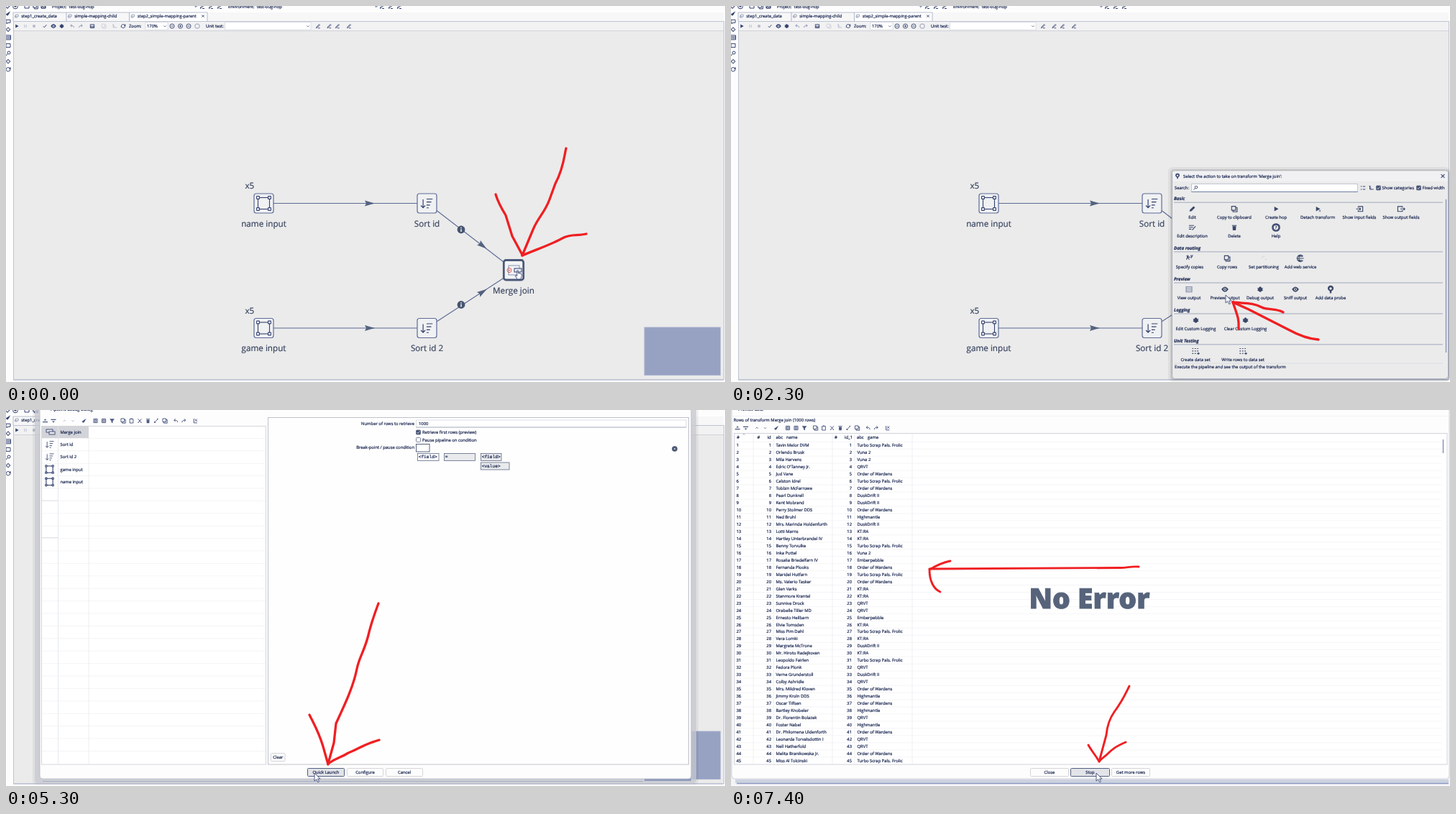
Animation of 1000 by 523 pixels, one loop 8000 ms. Source, as an HTML page:

```html
<!DOCTYPE html>
<html lang="en">
<head>
<meta charset="utf-8">
<title>Pipeline preview</title>
<style>
html, body { margin: 0; width: 100%; height: 100%; overflow: hidden; background: #fff; }
svg { display: block; width: 100%; height: 100%; }
text { font-family: "Open Sans", "Noto Sans", sans-serif; font-size: 5.87px; fill: #1f2b55; stroke: #1f2b55; stroke-width: .22px; text-rendering: geometricPrecision; white-space: pre; }
.big { font-size: 11.7px; fill: #36425f; stroke: #36425f; stroke-width: .2px; }
.head { font-size: 6.2px; font-weight: 700; font-style: italic; }
.mono { font-family: "Liberation Mono", monospace; font-size: 6.2px; }
.shout { font-size: 39px; font-weight: 800; fill: #56637b; stroke: #56637b; stroke-width: .9px; }
.pen { fill: none; stroke: #f01f22; stroke-width: 3.3; stroke-linecap: round; stroke-linejoin: round; }
</style>
</head>
<body>
<svg id="stage" viewBox="0 0 1000 523" preserveAspectRatio="none"></svg>
<script>
const INK = '#34426f', STEEL = '#53627f', PALE = '#b4bacb', SOFT = '#8791ad', RED = '#ee4a42';

const rect = (x, y, x2, y2, fill = 'none', stroke = 'none', r = 0, w = 1) =>
  `<rect x="${x}" y="${y}" width="${x2 - x}" height="${y2 - y}" rx="${r}" fill="${fill}" stroke="${stroke}" stroke-width="${w}"/>`;
const line = (x, y, x2, y2, color = INK, w = 1) =>
  `<path d="M${x} ${y}L${x2} ${y2}" stroke="${color}" stroke-width="${w}"/>`;
const text = (x, y, s, anchor = 'start', cls = '') =>
  `<text x="${x}" y="${y}" text-anchor="${anchor}" class="${cls}">${s.replace(/</g, '&lt;')}</text>`;
const mid = (x, y, s, cls) => text(x, y, s, 'middle', cls);
const pen = (d, w = 3.3) => `<path class="pen" style="stroke-width:${w}px" d="${d}"/>`;

// Glyphs sit around the origin, about 8 units wide; a leading * means filled.
const glyphs = {
  play: '*M-2-2.8L3 0L-2 2.8Z',
  pause: 'M-1.3-2.3V2.3M1.3-2.3V2.3',
  stop: '*M-2-2H2V2H-2Z',
  check: 'M-2.5 0L-.7 2L2.7-2.2',
  eye: '*M-4.3 0Q0-6.4 4.3 0Q0 6.4-4.3 0ZM-1.7 0A1.7 1.7 0 1 0 1.7 0A1.7 1.7 0 1 0-1.7 0ZM-.9 0A.9 .9 0 1 1 .9 0A.9 .9 0 1 1-.9 0',
  bug: '*M-2-1.5Q0-5 2-1.5L3.5-2L2.6 0L3.5 1.5L2 1.8Q0 4.6-2 1.8L-3.5 1.5L-2.6 0L-3.5-2Z',
  undo: 'M2.8 2.3Q3-1.2-2.4-.8M-.3-2.8L-2.5-.8L-.3 1.2',
  redo: 'M-2.8 2.3Q-3-1.2 2.4-.8M.3-2.8L2.5-.8L.3 1.2',
  image: 'M-3-2.5H3V2.5H-3ZM-3 1.8L-1-.5L.5 1L1.8-.5L3 1.8M-3 2.2H3',
  copy: 'M-3.2-3.2H1.6V1.6H-3.2ZM-1.6 1.6V3.4H3.4V-1.6H1.6',
  paste: 'M-2.5-2.5H2.5V3.2H-2.5ZM-1-3.2H1',
  cut: 'M-2.5-2.8L2 2.5M2.5-2.8L-2 2.5M-2.8 2.4h1.4M1.4 2.4h1.4',
  bin: '*M-2.2-1.6H2.2L1.8 3.4H-1.8ZM-2.8-3H2.8V-2.1H-2.8Z',
  turn: 'M2.7-1A3 3 0 0 0-3 0V2M-2.7 1A3 3 0 0 0 3 0V-2M1.2-1H3V-3',
  ring: 'M-3.4 0A3.4 3.4 0 1 1 3.4 0A3.4 3.4 0 1 1-3.4 0',
  minus: 'M-3.4 0A3.4 3.4 0 1 1 3.4 0A3.4 3.4 0 1 1-3.4 0M-1.7 0H1.7',
  plus: 'M-3.4 0A3.4 3.4 0 1 1 3.4 0A3.4 3.4 0 1 1-3.4 0M-1.7 0H1.7M0-1.7V1.7',
  fit: 'M-2-3.2H2L3.2-2V2L2 3.2H-2L-3.2 2V-2Z',
  pencil: '*M-3.3 3.3L-2.6.8L1.6-3.4L3.4-1.6L-.8 2.6Z',
  edit: 'M-2.8 2.8L-2 1L1.8-2.8L2.8-1.8L-1 2ZM0 3H3',
  down: 'M-1.8-.8L0 1L1.8-.8',
  up: 'M-1.8.8L0-1L1.8.8',
  brush: '*M3.2-3.2L.8 1.2L-1 3.2L-3.2 1L-1-.4Z',
  filter: '*M-3.5-3H3.5L1 .4V3.4L-1 2.3V.4Z',
  rowUp: '*M-3.7 1H3.7V2.4H-3.7ZM-2-.6L0-3L2-.6Z',
  rowDown: '*M-3.7-2.4H3.7V-1H-3.7ZM-2 .6L0 3L2 .6Z',
  all: 'M-2.7-2.7H2.7V2.7H-2.7ZM-1.2-1.2H1.2V1.2H-1.2Z',
  swap: 'M-2.7 2.5L2.5-2.7M1-2.7H2.7M-2.7 1V2.6H-1',
  sheet: 'M-2.5-3V3H2.5M-1-2.5L2.5 1M2.5-2.5L-1 1',
  glass: 'M-1-1A2 2 0 1 1 3-1A2 2 0 1 1-1-1M-.4.4L-3 3',
  gear: 'M-2.2 0A2.2 2.2 0 1 1 2.2 0A2.2 2.2 0 1 1-2.2 0M0-3.3V-2.2M0 2.2V3.3M-3.3 0H-2.2M2.2 0H3.3',
  box: 'M-3-2.5H3V2.5H-3Z',
  chat: 'M-3-2.4H3V1.6H0L-2 3V1.6H-3Z',
  table: 'M-3.5-3H3.5V3H-3.5ZM-3.5-1H3.5M-3.5 1H3.5',
  into: 'M-1.5-3H4V3H-1.5V1.5M-1.5-1.5V-3M-4 0H1.5M0-1.5L1.5 0L0 1.5',
  out: 'M1.5 1.5V3H-4V-3H1.5V-1.5M-1 0H4.5M3-1.5L4.5 0L3 1.5',
  lines: 'M-4-2.5H2M-4-.3H1M-4 2H-1M0 3L4-1.5',
  globe: 'M3-2.6A4 4 0 1 0 3 2.6M-4 0H4M0-4Q-4 0 0 4M-2.6-2.4H3M-2.6 2.4H2',
  dots: 'M-.5-2.5h1M2 1.5h1M-2.5-1h.8',
  power: 'M-3.5-1.5H1M-1.5-3.7L-4 1.5M-3.7-3.7L-.5 1.5M1.2-3.9L2.4-2M3.6-3.9L1.6-.2',
  probe: '*M-3.6-1A3.6 3.6 0 1 1 3.6-1Q3 1.6 1 2.3V4.6H-1V2.3Q-3 1.6-3.6-1ZM-1.5-1A1.5 1.5 0 1 0 1.5-1A1.5 1.5 0 1 0-1.5-1Z',
  grid: 'M-4-3h1.5M-1-3h1.5M2-3h1.5M-4 0h1.5M-1 0h1.5M2 0h1.5M-4 3h1.5M-1 3h1.5M2 3H5M3.5 1.5V4.5',
  tree: 'M-3-2.5H-1M-2-2.5V2H1M-2 0H0M1 2H3.2',
  list: 'M-3.2-2h1.6M-.2-2H3.2M-3.2 2h1.6M-.2 2H3.2',
  tab: 'M-2-2.4H2.6V1H-2ZM-3-.8V2.5H1',
  close: 'M-2.2-2.2L2.2 2.2M2.2-2.2L-2.2 2.2',
  cursor: 'M0 0V13L3.2 10.2L5.6 15L7.6 14L5.4 9.4H9.6Z',
  hand: 'M-1.5-7V2L-3.7.5L-4.3 2L-1 7H4.5L6 2V-1.5L.3-3V-7Z',
  sort: 'M-4.5-4.5V5M-7 2.5L-4.5 5.2L-2 2.5M-.5-5H6.5M-.5-1.5H5M-.5 2H3.5M-.5 5.2H2',
};
const icon = (name, x, y, color = INK, k = 1) => {
  const d = glyphs[name], solid = d[0] === '*';
  return `<path transform="translate(${x} ${y}) scale(${k})" d="${solid ? d.slice(1) : d}" ` +
    (solid ? `fill="${color}" fill-rule="evenodd"/>` : `fill="none" stroke="${color}" stroke-width="1"/>`);
};
const pointer = (x, y, shape = 'cursor') =>
  `<path transform="translate(${x} ${y}) scale(.85)" d="${glyphs[shape]}" fill="#fff" stroke="${INK}"/>`;
const button = (x, x2, s, on) =>
  rect(x + .5, 498.5, x2 - .5, 509.5, on ? '#e3e4e8' : '#fdfdfd', on ? '#525f82' : '#d5d5d8', 1) + mid((x + x2) / 2, 506, s);
const checkbox = (x, y, on) => rect(x - 3, y - 3, x + 3, y + 3, on ? '#43506f' : '#fff', '#5b6786', 1, .8) +
  (on ? icon('check', x, y, '#fff', .75) : '');

function corners(x, y, k = 1) {
  const s = 8 * k, b = 1.9 * k;
  return rect(x - s, y - s, x + s, y + s, 'none', INK, 0, 1.1) +
    [[-1, -1], [1, -1], [-1, 1], [1, 1]].map(([i, j]) =>
      rect(x + i * s - b, y + j * s - b, x + i * s + b, y + j * s + b, '#fff', INK, .4, 1.1)).join('');
}

function node(x, y, label, kind) {
  const body = kind === 'input' ? corners(x, y) + text(x - 26, y - 20.5, 'x5', 'start', 'big') : icon('sort', x, y, INK, 1.2);
  return rect(x - 13.5, y - 13.5, x + 13.5, y + 13.5, '#f0f1f3', '#5d6c9a', 3, 1.2) + body + mid(x, y + 32, label, 'big');
}

function hop(x, y, x2, y2, ax, ay) {
  const turn = Math.atan2(y2 - y, x2 - x) * 180 / Math.PI;
  return line(x, y, x2, y2, '#5c6b94', 1.1) +
    `<path transform="translate(${ax} ${ay}) rotate(${turn})" d="M-7-4L7 0L-7 4L-5 0Z" fill="${STEEL}"/>`;
}
const info = (x, y) => `<circle cx="${x}" cy="${y}" r="5.4" fill="#46546f"/>` +
  line(x, y - .8, x, y + 3, '#fff', 1.4) + line(x, y - 3.2, x, y - 1.8, '#fff', 1.4);

function editor() {
  let s = rect(0, 0, 1000, 523, '#fdfdfd') + rect(10, 9, 998, 21, '#f7f7f8');
  // menu row, cut by the top edge
  s += text(64, 2.5, 'Project:  test-bug-hop') + text(309, 2.5, 'Environment:  test-bug-hop');
  [['gear', 2], ['plus', 13], ['box', 29], ['copy', 41], ['image', 52], ['down', 264], ['edit', 273], ['edit', 285], ['edit', 297],
    ['down', 515], ['edit', 523], ['edit', 535], ['edit', 547]].forEach(([g, x]) => s += icon(g, x, .5));
  // tabs
  s += rect(172, 9, 280, 21, '#fff');
  [[10, 'step1_create_data'], [84, 'simple-mapping-child'], [171.5, 'step2_simple-mapping-parent']].forEach(([x, t]) =>
    s += line(x, 9, x, 21, '#9fa7bd', .8) + icon('tab', x + 5, 14, SOFT, .8) + text(x + 11.3, 16.2, t));
  s += line(10, 9, 280, 9, '#a9b0c4', .8) + line(280, 9, 280, 21, '#9fa7bd', .8) + icon('close', 274, 14, INK, .8);
  s += rect(10.5, 21.5, 998.5, 519.5, '#ebebeb', '#b9bfd0', 0, .9) + rect(11, 22, 998, 34.5, '#f2f2f3') + line(11, 34.5, 998, 34.5, '#c4c8d2', .7);
  s += line(10, 520.5, 998, 520.5, '#cdd2e0', 1);
  // toolbar
  [['play', 15], ['pause', 27, PALE], ['stop', 39, PALE], ['check', 54], ['eye', 66], ['bug', 77.5], ['undo', 92, SOFT], ['redo', 104, SOFT],
    ['image', 120], ['copy', 136, '#cfd2dc'], ['tree', 151, PALE], ['turn', 163], ['minus', 231], ['plus', 242.5], ['minus', 254], ['fit', 266, SOFT],
    ['edit', 434], ['edit', 449.5], ['edit', 461], ['edit', 477]].forEach(([g, x, c]) => s += icon(g, x, 28, c || INK, .9));
  s += text(171, 30, 'Zoom:') + rect(194, 22.8, 225, 33, '#fff', '#d4d6dd', 0, .7) + text(196, 30, '170%') + icon('down', 221, 28, SOFT);
  s += text(278, 30, 'Unit test:') + rect(304.5, 22.8, 424, 33, '#fff', '#d4d6dd', 0, .7) + icon('down', 420, 28, SOFT);
  // side bar
  ['brush', 'chat', 'gear', 'table', 'box', 'glass', 'gear', 'turn'].forEach((g, i) => s += icon(g, 3, 10.5 + i * 11.1));
  // graph
  s += hop(372, 274.5, 572, 274.5, 506, 274.5) + hop(372, 448, 572, 448, 506, 448);
  s += hop(599, 284.5, 692, 356, 663, 333.5) + hop(599, 439, 692, 378.5, 663, 397.5) + info(633, 311) + info(633, 415.5);
  s += node(358.5, 274.5, 'name input', 'input') + node(358.5, 448, 'game input', 'input');
  s += node(585.5, 274.5, 'Sort id') + node(585.5, 448, 'Sort id 2');
  s += rect(692.3, 353.5, 719.7, 381, '#f3f4f6', '#4c5a78', 3, 2.8) + rect(699, 361, 714, 374, 'none', '#7c88a8', 0, .9);
  s += icon('minus', 700, 367.5, RED, .9) + rect(707, 365, 717, 370, '#e8eaf0', INK, 0, 1) + pointer(712, 374, 'hand');
  s += mid(706, 400, 'Merge join', 'big');
  return s + rect(888, 447, 993.5, 513.5, '#97a2c3', '#a9b2cf', 0, 1);
}

const pointMerge = () =>
  pen('M779 198C777 204 776 225 764 247L756 269C749 288 740 294 733 311L718 347') +
  pen('M681 262C685 275 690 283 695 291L704 320L718 346') +
  pen('M807 317C795 320 786 317 776 322C760 331 742 337 718 347');

function section(title, y, rows) {
  let s = text(616, y, title, 'start', 'head') + line(616, y + 3.2, 990, y + 3.2, '#8d97b0', .8);
  rows.forEach((row, i) => row.forEach(([g, x, label, color]) =>
    s += icon(g, x, y + 12.3 + i * 25.8, color || '#3a4769', 1.15) + mid(x, y + 26 + i * 25.8, label)));
  return s;
}

function actions() {
  const body = '#ebebeb';
  let s = rect(608, 224, 1000, 523, 'rgba(0,0,0,.05)', 'none', 6) + rect(611, 227, 1000, 521, 'rgba(0,0,0,.1)', 'none', 5);
  s += rect(613.5, 229, 997.5, 518.5, body, '#a9adb8', 4) + rect(614, 229.5, 997, 244, '#f1f1f3', 'none', 3);
  s += icon('probe', 621, 236.5, INK, .8) + text(629, 239, "Select the action to take on transform 'Merge join':") + icon('close', 990, 236.5, INK, 1.1);
  s += text(617, 255.3, 'Search:') + rect(640.5, 247.5, 871.5, 258.5, '#fff', '#b5bbca', 0, .8) + line(640.5, 258.5, 871.5, 258.5, '#66759f', .9) + icon('glass', 646, 253, INK, .9);
  s += icon('list', 879, 253) + icon('tree', 890.5, 253) + checkbox(900.5, 253, 1) + text(905.5, 255.3, 'Show categories') + checkbox(956.5, 253, 1) + text(961.5, 255.3, 'Fixed width');
  s += line(994.5, 269, 994.5, 482, '#7f8dba', 1.3);
  s += section('Basic', 270, [
    [['pencil', 641.5, 'Edit'], ['copy', 700, 'Copy to clipboard'], ['play', 758, 'Create hop'], ['play', 816, 'Detach transform'],
      ['into', 874, 'Show input fields'], ['out', 932, 'Show output fields']],
    [['lines', 641.5, 'Edit description'], ['bin', 700, 'Delete'], ['ring', 758, 'Help']]]);
  s += icon('ring', 758, 308, INK, 1.5) + mid(758, 310.3, '?') + icon('close', 819, 285, INK, .6);
  s += section('Data routing', 338.7, [[['power', 638, 'Specify copies'], ['copy', 690, 'Copy rows'], ['dots', 741, 'Set partitioning', PALE], ['globe', 792, 'Add web service']]]);
  s += section('Preview', 381.8, [[['table', 637, 'View output', SOFT], ['eye', 687, 'Preview output'], ['bug', 736, 'Debug output'], ['eye', 785, 'Sniff output'], ['probe', 834, 'Add data probe']]]);
  s += section('Logging', 424.8, [[['bug', 646.5, 'Edit Custom Logging'], ['bug', 715.5, 'Clear Custom Logging']]]);
  s += section('Unit Testing', 467.6, [[['grid', 646, 'Create data set'], ['grid', 712, 'Write rows to data set']]]);
  s += line(616, 497, 990, 497, '#d5d8e0', .8) + text(617, 504, 'Execute the pipeline and see the output of the transform') + pointer(688, 402);
  return s + pen('M817 464C800 463 786 456 775 450L720 422L698 412') + pen('M768 426C758 420 745 423 738 419C725 412 712 414 698 412') + pen('M706 449C707 435 704 430 698 412');
}

function tableTools(x, y, faint) {
  return [['rowUp', 0], ['rowDown', 11.5], ['up', 27, faint], ['down', 38.5, faint], ['brush', 54], ['all', 70], ['all', 81.5], ['filter', 93], ['copy', 108.5],
    ['paste', 120], ['cut', 131.5], ['bin', 143], ['swap', 154.5], ['copy', 166.5], ['undo', 181.5], ['redo', 193], ['sheet', 209]]
    .map(([g, dx, c]) => icon(g, x + dx, y, c || '#4a5780', .95)).join('');
}

function debug() {
  let s = rect(37, -9, 963, 521, 'rgba(0,0,0,.05)', 'none', 6) + rect(40, -9, 960, 519.5, 'rgba(201,202,208,.75)', 'none', 5);
  s += line(51, 516.5, 886, 516.5, '#a5aec8', 1) + rect(888, 513, 953, 516, '#8f9abc');
  s += rect(47, -9, 953, 513, '#fdfdfd', '#b3b6c0', 4, .8) + text(62, 1.2, 'Pipeline debug dialog') + tableTools(54.5, 15, PALE);
  // transform list
  s += rect(49.5, 22.5, 361.5, 493, '#fff', '#c9ccd5', 0, .8);
  for (let i = 1; i < 27; i++) s += line(50, 22 + i * 17.4, 361, 22 + i * 17.4, '#f0f0f3', .7);
  s += rect(50, 22.5, 115, 39, '#d3d4d9') + line(72.5, 22, 72.5, 493, '#e3e4ea', .8) + line(115, 39, 115, 493, '#e9eaee', .8);
  s += line(50, 126, 72, 126, '#d8dae2', .8) + line(50, 177.5, 72, 177.5, '#d8dae2', .8);
  s += rect(56, 27, 65, 31, '#e6e7eb', INK, 0, .9) + rect(60, 30, 68, 34, '#e6e7eb', INK, 0, .9);
  ['Merge join', 'Sort id', 'Sort id 2', 'game input', 'name input'].forEach((t, i) => {
    const y = 30.5 + i * 17.35;
    s += text(75.5, y + 2.1, t) + (i > 2 ? corners(60.5, y, .58) : i ? icon('sort', 61, y, INK, .85) : '');
  });
  // settings
  s += rect(364.5, 10.5, 949.5, 493, '#fefefe', '#b9bcc6', 0, .9);
  s += text(568, 21, 'Number of rows to retrieve', 'end') + rect(570.5, 14, 946, 24, '#fff', '#d5d7de', 0, .8) + line(570, 24, 946, 24, '#a3a9ba', .8) + text(574, 21, '1000');
  s += checkbox(573.5, 31, 1) + text(579, 33, 'Retrieve first rows (preview)') + checkbox(573.5, 41.5) + text(579, 43.5, 'Pause pipeline on condition');
  s += text(568, 54, 'Break-point / pause condition', 'end') + rect(570.5, 47.5, 589, 58, '#fff', '#46536f', 0, .9);
  s += `<circle cx="930" cy="54" r="3.8" fill="#46546f"/>` + icon('close', 930, 54, '#fff', .6);
  [[572.5, 602, 60, '<field>', '#fff'], [609.5, 652.5, 60, '=', '#e9eaec'], [660.5, 689, 60, '<field>', '#e9eaec'], [660.5, 700, 72.5, '<value>', '#e9eaec']]
    .forEach(([x, x2, y, t, f]) => s += rect(x, y + .5, x2, y + 10.5, f, '#5f6a85', 0, .8) + text(x + 1.2, y + 7, t, 'start', 'mono'));
  s += rect(368.5, 477.5, 388, 488.5, '#fdfdfd', '#cfd0d6', 1, .9) + mid(378.3, 485, 'Clear');
  s += button(419, 471, 'Quick Launch', 1) + button(474, 525, 'Configure') + button(528, 580, 'Cancel') + pointer(429, 505);
  return s + pen('M518 269C512 285 508 296 504 313C499 334 491 344 488 360C483 385 472 408 459 436L456 463L448 492') +
    pen('M422 424C430 440 435 448 441 468L448 493') + pen('M519 459C500 464 487 473 476 477C465 484 459 484 448 492');
}

const people = `Tavin Melor DVM,Orlendo Brusk,Mila Harvens,Edric O'Tanney Jr.,Jud Vane,Calston Idrel,Tobbin McFarrowe,Pearl Dunkrell,Kent Mobrand,Perry Stolmer DDS,
Ned Bruhl,Mrs. Marinda Holdenfurth,Lotti Marns,Hartley Unterbrandel IV,Benny Torvulke,Inka Pottel,Rosalia Briedelfarn IV,Fernanda Plooks,Maridel Hutfarn,Ms. Valerio Tasker,
Glen Varks,Stanmore Krantel,Sunniva Drock,Orabelle Tiller MD,Ernesto Heilbarn,Elvie Tomsden,Miss Pim Dahl,Vera Lomki,Margrete McTrone,Mr. Hiroto Radejkovan,
Leopoldo Fairlen,Fedora Plonk,Verne Grunderstoll,Colby Ashridle,Mrs. Mildred Kloven,Jimmy Kroln DDS,Oscar Tilfsen,Bartley Knobeler,Dr. Florentin Bolazek,Foster Nabel,
Dr. Philomena Uldenforth,Leonarda Torvalsdottin I,Nell Hatherfold,Melita Branikowska Jr.,Miss Al Tolcinski`.split(/,\s*/);
const games = { S: 'Turbo Scrap Pals. Frolic', D: 'Vuna 2', P: 'QRVT', L: 'Order of Wardens', C: 'DuskDrift II', O: 'Highmantle', G: 'KT:RA', H: 'Emberpebble' };
const played = 'SDDPLSLCCLOCGGSDHLSLGGPPHGSGCGSPCPLOLOPOLPPLS';

function results() {
  let s = rect(0, 0, 1000, 523, '#f2f3f6') + rect(1, -6, 999, 513, '#fdfdfd', '#c3c7d3', 4, .8);
  s += rect(6, 514, 998, 519, '#cdd2e0') + line(8, 519.5, 998, 519.5, '#8d9ac2', 1.3) + rect(0, 521, 1000, 523, '#f8f8fa');
  s += text(10, 1, 'Preview data') + line(0, 8.5, 1000, 8.5, '#eceef4', .7) + text(3.5, 15.8, 'Rows of transform Merge join (1000 rows)') + tableTools(9, 25, '#6c7899');
  s += rect(4.5, 32.5, 996, 493, '#fff', '#c6c9d4', 0, .8);
  [31, 59, 141, 172, 252].forEach(x => s += line(x, 33, x, 493, '#e8e9ef', .7));
  s += icon('up', 18, 34, SOFT, .8);
  [[8, '#'], [36.5, '#'], [50.5, 'id'], [62.5, 'abc'], [77, 'name'], [144, '#'], [158, 'id_1'], [175, 'abc'], [190, 'game']].forEach(([x, t]) => s += text(x, 40, t));
  const step = 9.964;
  people.forEach((name, i) => {
    const y = 51.4 + i * step, n = String(i + 1);
    s += line(5, y - 7.1, 988, y - 7.1, '#eeeff3', .6) + text(7.5, y, n) + text(56, y, n, 'end') + text(62.5, y, name) + text(168, y, n, 'end') + text(175.5, y, games[played[i]]);
  });
  s += line(990.5, 41, 990.5, 60, '#7f8dba', 1.4) + mid(498.5, 276.3, 'No Error', 'shout');
  s += button(416, 470, 'Close') + button(472, 527, 'Stop', 1) + button(529, 583, 'Get more rows') + pointer(508, 505);
  return s + pen('M567 218C556 217 550 220 540 219.5L276 221', 2.9) + pen('M305 210C295 212 286 216 276 222C276 238 282 249 291 253', 2.9) +
    pen('M554 384C549 394 545 404 533 420C526 430 523 440 522 452L512 489', 2.9) + pen('M497 466C502 475 507 480 512 489C516 484 520 482 523 479C530 472 535 468 549 462', 2.9);
}

const stage = document.getElementById('stage');
const scenes = [[0, pointMerge], [500, actions], [3500, debug], [6500, results]];
stage.innerHTML = editor() + scenes.map(([, draw]) => `<g class="scene">${draw()}</g>`).join('');
const layers = [...stage.querySelectorAll('.scene')];
const LOOP = 8000;

function show(t) {
  const now = scenes.filter(([start]) => t >= start).length - 1;
  layers.forEach((g, i) => g.setAttribute('display', i === now ? 'inline' : 'none'));
}
const begin = performance.now();
function tick() {
  show((performance.now() - begin) % LOOP);
  requestAnimationFrame(tick);
}
tick();
</script>
</body>
</html>
```
